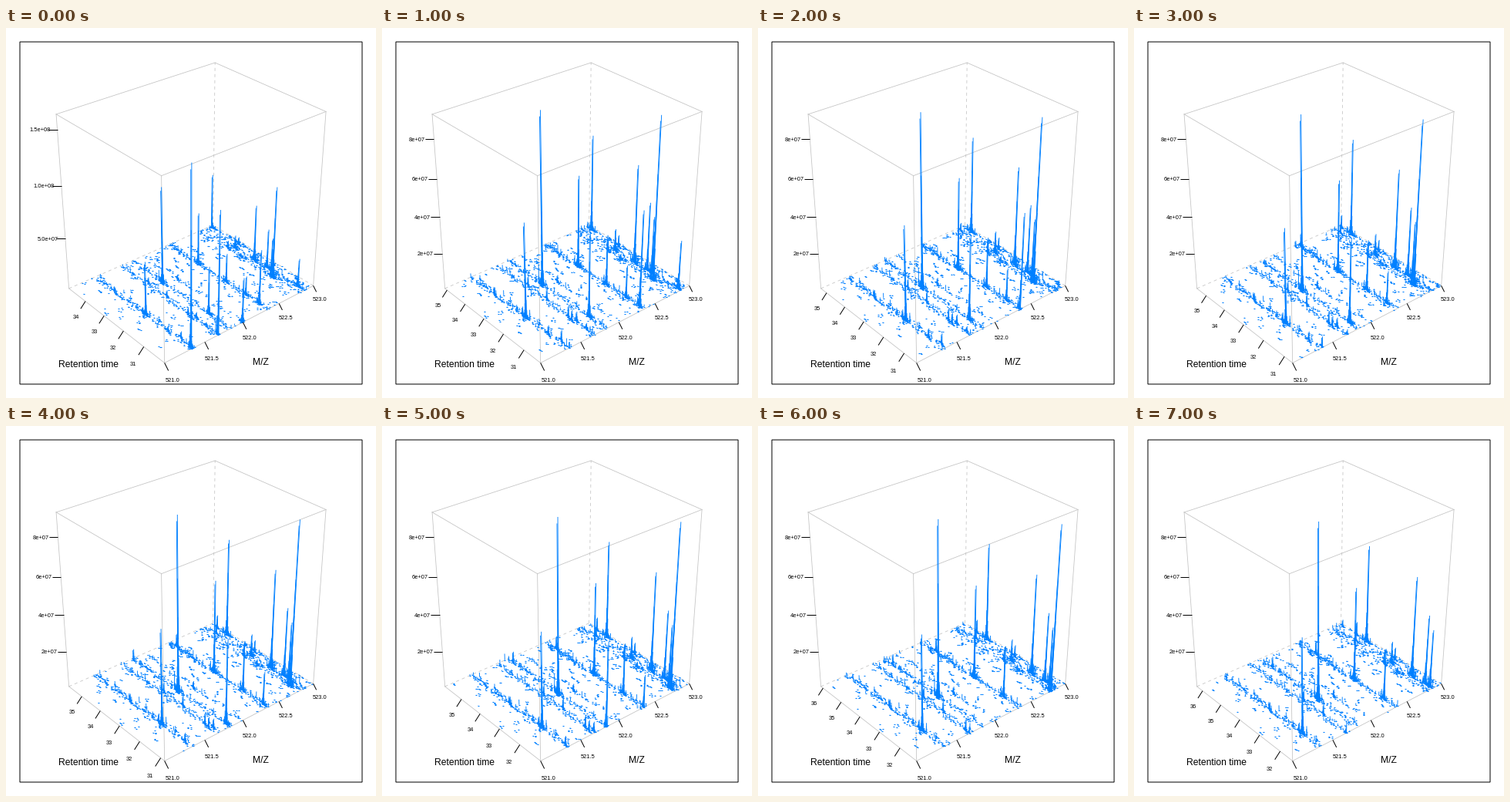
Recreate the animation shown at these times as a matplotlib script. Size 480 by 480 pixels, loop 8000 ms.

```python
import numpy as np
import matplotlib.pyplot as plt
from matplotlib.animation import FuncAnimation
from matplotlib.collections import LineCollection

SIZE, DPI = 480, 100
PX = 72 / DPI
BLUE, GREY = "#0080ff", "#c4c4c4"
RT_START, RT_STEP, RT_SPAN = 30.02, 0.2, 4.9
RT_END = RT_START + 7 * RT_STEP + RT_SPAN
Z_FIRST, Z_REST = 1.63e8, 9.22e7

# Screen places of the box corners; a key's digits are m/z, time, intensity
CORNERS = {
    "000": (205, 434.5), "100": (399, 334), "010": (82, 338),
    "110": (268.5, 256), "001": (202, 192), "101": (415, 108.5),
    "011": (65, 111.5), "111": (271, 45),
}

# m/z position of each band: its main peaks as (time, height)
BANDS = {
    .171: [(30.08, 1.77), (32.25, .55)],
    .341: [(30.06, 1.24)],
    .419: [(31.05, .49), (33.33, 1)],
    .500: [(30.05, .46)],
    .676: [(30.45, .56), (31.07, .19), (32, .3), (33.4, .55)],
    .900: [(31.27, .95)],
    .938: [(30.35, .29), (31.57, .34), (31.78, .41), (32.39, .59),
           (33.35, .13)],
    .985: [(34.89, .59)],
}


def unit(key):
    return np.array([int(c) for c in key], float)


def fit_camera():
    rows, rhs = [], []
    for key, place in CORNERS.items():
        point = np.append(unit(key), 1)
        for i, pos in enumerate(place):
            row = np.zeros(11)
            row[4 * i:4 * i + 4] = point
            row[8:] = -pos * point[:3]
            rows.append(row)
            rhs.append(pos)
    sol = np.linalg.lstsq(np.array(rows), np.array(rhs), rcond=None)[0]
    return np.append(sol, 1).reshape(3, 4)


CAMERA = fit_camera()


def project(u, v, w):
    u, v, w = np.broadcast_arrays(u, v, w)
    p = np.stack([u, v, w, np.ones(u.shape)], -1) @ CAMERA.T
    return p[..., :2] / p[..., 2:]


def peak(u, t, h):
    """Scans falling off on both sides of a twin top."""
    for k in range(13):
        side = (-1) ** k
        share = .97 ** k * np.exp(-.36 * max(k - 1, 0))
        yield u + .004 * side, t + side * (k + 1) // 2 * .022, h * share


def make_signal():
    rng = np.random.default_rng(12)
    pts = []
    for u, peaks in BANDS.items():
        for t, h in peaks:
            pts += peak(u, t, h)
            for _ in range(int(8 + 14 * min(h, 1))):
                pts.append((u + rng.normal(0, .007), t + rng.normal(0, .09),
                            min(h, 1) * rng.exponential(.035)))
        # weak signal all along the band, stronger where the peaks are high
        strength = min(sum(h for _, h in peaks), 1.6) / 1.6
        for t in np.arange(30, RT_END, .035):
            for _ in range(rng.binomial(2, .15 + .4 * strength)):
                pts.append((u + rng.normal(0, .012), t,
                            rng.exponential(.002 + .006 * strength)))
    # small bumps, most of them on a band
    for _ in range(26):
        u = rng.choice(list(BANDS)) + rng.normal(0, .01)
        pts += peak(u, rng.uniform(30.5, RT_END), rng.uniform(.025, .08))
    # short runs scattered over the floor
    for _ in range(190):
        u, t = rng.uniform(0, 1) ** .75, rng.uniform(30, RT_END)
        for k in range(rng.integers(1, 6)):
            pts.append((u + rng.normal(0, .007), t + .04 * k,
                        rng.exponential(.001)))
    pts = np.array(pts)
    return pts[(pts[:, 0] >= 0) & (pts[:, 0] <= 1)].T


MZ, RT, HEIGHT = make_signal()

plt.rcParams["font.family"] = "Liberation Sans"
fig = plt.figure(figsize=(SIZE / DPI, SIZE / DPI), dpi=DPI, facecolor="white")
ax = fig.add_axes([0, 0, 1, 1])
ax.set(xlim=(0, SIZE), ylim=(SIZE, 0))
ax.axis("off")


def label(x, y, s, size=7.5):
    return ax.text(x, y, s, fontsize=size * PX, ha="center",
                   va="center_baseline", color="black")


def lines(color, width, z):
    coll = LineCollection([], colors=color, linewidths=width * PX, zorder=z)
    return ax.add_collection(coll)


def tick(x, y, dx, dy):
    return [(x, y), (x + dx, y + dy)]


ax.add_patch(plt.Rectangle((18, 18), 444, 444, fill=False, ec="black",
                           lw=PX, snap=False))
for a in CORNERS:
    for b in CORNERS:
        if a < b and np.abs(unit(a) - unit(b)).sum() == 1:
            x, y = project(*np.array([unit(a), unit(b)]).T).T
            hidden = "110" in (a, b)
            ax.plot(x, y, color=GREY, lw=.8 * PX, zorder=1,
                    ls=(0, (5, 5)) if hidden else "-")

label(106.5, 435.5, "Retention time", 12.1)
label(330.5, 432.5, "M/Z", 12.1)

mz_ticks = []
for u in np.linspace(0, 1, 5):
    x, y = project(u, 0, 0)
    s = 1 - .2 * u
    mz_ticks.append(tick(x, y, 5 * s, 10 * s))
    label(x + 10 * s, y + 21.8 * s, f"{521 + 2 * u:.1f}")
lines("black", 1, 3).set_segments(mz_ticks)

spikes = lines(BLUE, .9, 2)
feet = lines(BLUE, 1.1, 2)
ticks = lines("black", 1, 3)
rt_labels = [label(0, 0, "") for _ in range(6)]
z_labels = [label(0, 0, "") for _ in range(4)]


def draw(i):
    start = RT_START + RT_STEP * i
    z_max = Z_REST if i else Z_FIRST
    v = (RT - start) / RT_SPAN
    seen = (v >= 0) & (v <= 1)
    u, v = MZ[seen], v[seen]
    w = np.minimum(HEIGHT[seen] * Z_REST / z_max, 1)
    base = project(u, v, 0)
    spikes.set_segments(np.stack([base, project(u, v, w)], 1))
    feet.set_segments(np.stack([base - (1, 0), base + (1, 0)], 1))

    for text in rt_labels + z_labels:
        text.set_text("")
    marks = []
    times = np.arange(np.ceil(start), start + RT_SPAN)
    for t, text in zip(times, rt_labels):
        pos = (t - start) / RT_SPAN
        x, y = project(0, pos, 0)
        s = 1 - .15 * pos
        marks.append(tick(x, y, -7 * s, 11 * s))
        text.set(text=f"{t:.0f}", position=(x - 14 * s, y + 22.6 * s))

    step, digits = (2e7, 0) if i else (5e7, 1)
    for z, text in zip(np.arange(step, z_max, step), z_labels):
        x, y = project(0, 1, z / z_max)
        marks.append(tick(x, y, -11.5, 0))
        text.set(text=f"{z:.{digits}e}", position=(x - 22.5, y))
    ticks.set_segments(marks)
    return [spikes, feet, ticks, *rt_labels, *z_labels]


anim = FuncAnimation(fig, draw, frames=8, interval=1000, repeat=True,
                     repeat_delay=0, blit=False)
plt.show()
```
